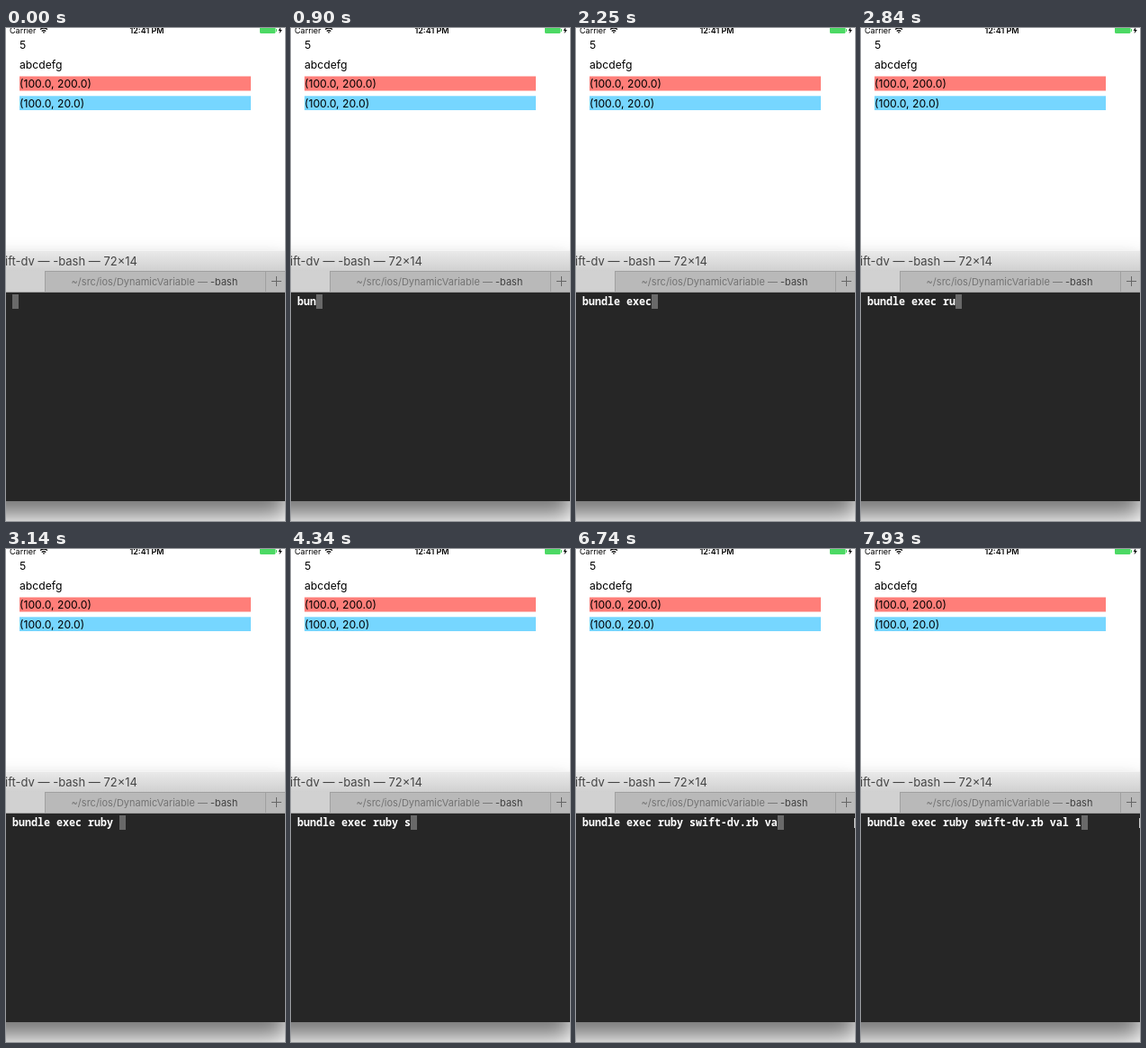
Recreate the animation shown at these times as an HTML page. Size 310x546 px, loop 8000 ms.

```html
<!DOCTYPE html>
<html lang="en">
<meta charset="utf-8">
<title>Terminal typing</title>
<style>
  html, body { margin: 0; height: 100%; overflow: hidden; background: #fff; }
  svg { display: block; width: 310px; height: 546px; }
  text { font-family: Inter, Roboto, sans-serif; }
  .status { font-size: 9px; }
  .label { font-size: 12.2px; }
  .tab { font-size: 11px; fill: #737373; }
  .shell { font: 600 11.667px "Noto Sans Mono", "DejaVu Sans Mono", monospace; fill: #fff; }
  .window { filter: drop-shadow(0 16px 13px rgba(0, 0, 0, .55)); }
</style>
<svg viewBox="0 0 310 546">
  <defs>
    <linearGradient id="bar" x2="0" y2="1">
      <stop stop-color="#ebebeb"/>
      <stop offset="1" stop-color="#d0d0d0"/>
    </linearGradient>
  </defs>

  <!-- status bar -->
  <text class="status" x="4" y="6">Carrier</text>
  <g fill="none" stroke="#000" stroke-width="1.3">
    <path d="M38 1.6Q42 -1.6 46 1.6M39.7 3.5Q42 1.6 44.3 3.5"/>
    <path d="M40.8 4.6Q42 3.8 43.2 4.6L42 6Z" fill="#000" stroke="none"/>
  </g>
  <text class="status" x="156.5" y="6" text-anchor="middle" font-weight="600">12:41 PM</text>
  <rect x="282" y="-2" width="17.5" height="8" rx="1.5" fill="#4cd964"/>
  <rect x="300" y="1" width="1" height="3" fill="#4cd964"/>
  <path d="M305.3 -1L302.6 3H304.4L303.6 6.3L306.8 2H304.9Z"/>

  <!-- app labels -->
  <rect x="15" y="53.5" width="257" height="16" fill="#ff7e79"/>
  <rect x="15" y="75.3" width="257" height="15.7" fill="#76d6ff"/>
  <g class="label">
    <text x="15" y="22.7">5</text>
    <text x="15" y="44.5">abcdefg</text>
    <text x="15" y="66">(100.0, 200.0)</text>
    <text x="15" y="87.7">(100.0, 20.0)</text>
  </g>

  <!-- terminal window -->
  <rect class="window" x="-300" y="246" width="612" height="278" fill="#262626"/>
  <rect y="246" width="310" height="23" fill="url(#bar)"/>
  <rect y="246" width="310" height="1" fill="#f4f4f4"/>
  <text x="146" y="263" text-anchor="end" font-size="13" fill="#444">swift-dv — -bash — 72×14</text>
  <rect y="269" width="310" height="24" fill="#b9b9b9"/>
  <rect y="269" width="43" height="24" fill="#d1d1d1"/>
  <path d="M43 269.5H310M43.5 269V293M288.5 269V293M0 292.5H310" stroke="#a0a0a0"/>
  <text class="tab" x="165" y="285" text-anchor="middle">~/src/ios/DynamicVariable — <tspan fill="#404040">-bash</tspan></text>
  <path d="M295 280.5H306M300.5 275V286" stroke="#666"/>
  <text class="shell" id="line" x="7" y="307"></text>
  <rect id="cursor" y="295" width="7" height="16" fill="#696969"/>
  <rect id="mark" x="309" y="298" width="1" height="11" fill="#ccc"/>
</svg>
<script>
  const LOOP = 8000, CELL = 7;
  const command = "bundle exec ruby swift-dv.rb val 1";
  // [time in ms, characters typed so far]
  const keys = [
    [0, 0], [600, 1], [750, 2], [900, 3], [1050, 5], [1200, 6], [1350, 8],
    [1650, 9], [1800, 10], [2250, 11], [2690, 12], [2840, 14], [2990, 15],
    [3140, 17], [4340, 18], [4490, 20], [4640, 29], [6740, 31], [7040, 32],
    [7780, 33], [7930, 34]
  ];
  const [line, cursor, mark] = ["line", "cursor", "mark"].map(id => document.getElementById(id));

  function draw() {
    const t = performance.now() % LOOP;
    const typed = keys.findLast(([start]) => start <= t)[1];
    line.textContent = command.slice(0, typed);
    cursor.setAttribute("x", CELL * (typed + 1));
    mark.setAttribute("visibility", typed >= 29 ? "visible" : "hidden");
    requestAnimationFrame(draw);
  }
  draw();
</script>
</html>
```
